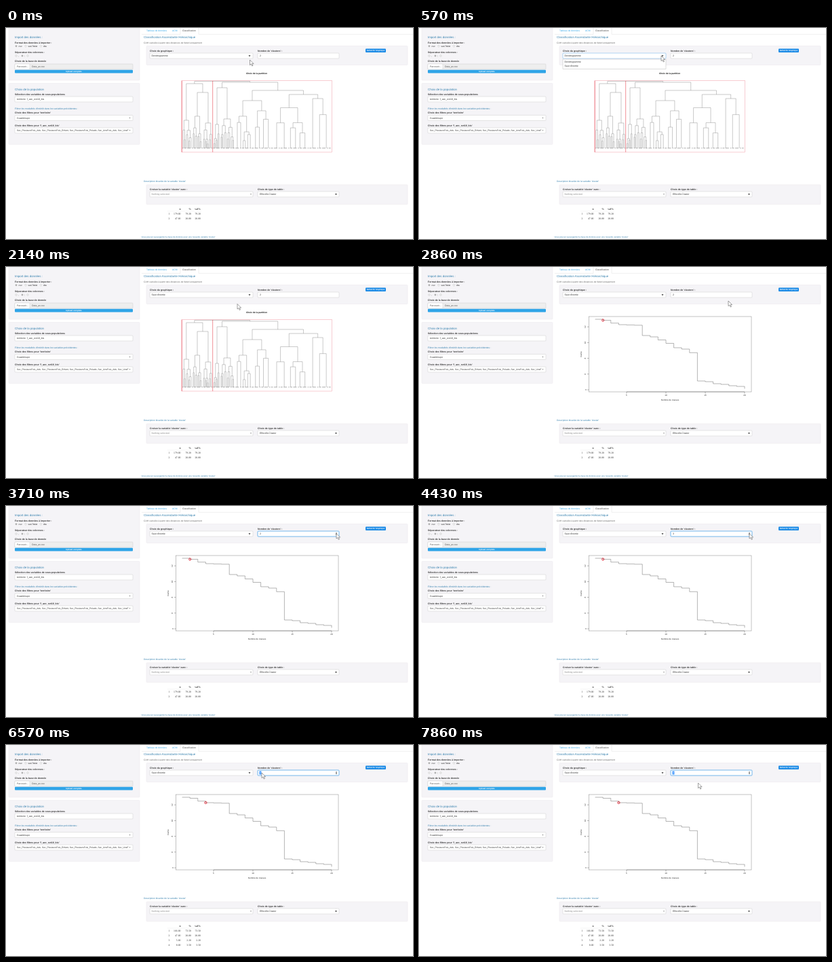
Write an HTML page that moves like this. It is 600 px wide and 311 px high and loops after 8000 ms.

```html
<!DOCTYPE html>
<html lang="fr">
<head>
<meta charset="utf-8">
<style>
html, body { margin: 0; width: 100%; height: 100%; overflow: hidden; background: #fff; }
svg { display: block; width: 100vw; height: 100vh; }
text { font-family: "Liberation Sans", Arial, sans-serif; text-rendering: geometricPrecision; white-space: pre; }
.serif { font-family: "Liberation Serif", Times, serif; }
</style>
</head>
<body>
<svg id="stage" viewBox="0 0 600 311"></svg>
<script>
const BLUE = '#317eac', SKY = '#2fa4e7', INK = '#333', GREY = '#888', RED = '#e02030';
const middle = 'text-anchor="middle" ', bold = 'font-weight="bold" ';

const text = (x, y, size, str, fill = INK, more = '') =>
  `<text x="${x}" y="${y}" font-size="${size}" fill="${fill}" ${more}>${str}</text>`;
const label = (x, y, str) => text(x, y, 3.5, str, INK, bold);
const value = (x, y, str, fill) => text(x, y, 3.5, str, fill);
const rect = (x, y, x2, y2, fill, stroke = 'none', more = '') =>
  `<rect x="${x}" y="${y}" width="${x2 - x}" height="${y2 - y}" fill="${fill}" stroke="${stroke}" stroke-width=".5" ${more}/>`;
const path = (d, stroke, width = .5, fill = 'none') =>
  `<path d="${d}" fill="${fill}" stroke="${stroke}" stroke-width="${width}"/>`;
const well = (x, y, x2, y2) => rect(x, y, x2, y2, '#f5f4f7', '#e8e6ea', 'rx="1"');
const field = (x, y, x2, more = '') => rect(x, y, x2, y + 8, '#fff', '#ccc', 'rx="1" ' + more);
const caret = (x, y) => path(`M${x - 1.5} ${y}h3l-1.5 2z`, 'none', 0, INK);
const smallCaret = (x, y) => path(`M${x - 1} ${y}h2l-1 1.2z`, 'none', 0, '#666');
const radio = (x, y, on) =>
  `<circle cx="${x}" cy="${y}" r="1.25" fill="#fff" stroke="#999" stroke-width=".35"/>` +
  (on ? `<circle cx="${x}" cy="${y}" r=".7" fill="#555"/>` : '');

function leftPanels() {
  return well(4, -4, 197, 77) + well(4, 81.5, 197, 171.5) +
    text(13, 14.8, 4.35, 'Import des données :', BLUE) +
    label(13, 22.6, 'Format des données à importer :') +
    radio(15, 26.7, true) + text(18.5, 28, 3.4, 'csv') +
    radio(29, 26.7) + text(32.5, 28, 3.4, 'sas7bdat') +
    radio(51.5, 26.7) + text(55, 28, 3.4, 'dta') +
    label(13, 36.6, 'Séparateur des colonnes :') +
    radio(15, 41) + text(18, 42, 3.4, ',') +
    radio(24, 41, true) + text(27, 42, 3.4, ';') + radio(32, 41) +
    label(13, 50, 'Choix de la base de donnée') +
    rect(13, 53, 187, 61, '#eee', '#ccc', 'rx="1"') + rect(13, 53, 35, 61, '#fff', '#ccc', 'rx="1"') +
    value(16, 58.4, 'Parcourir...', '#555') + value(38, 58.4, 'Data_av.csv', '#555') +
    rect(13, 61.7, 187, 66.5, SKY, 'none', 'rx="1"') +
    text(100, 65.2, 2.9, 'Upload complete', '#fff', middle + bold) +
    text(13, 91.6, 4.35, 'Choix de la population', BLUE) +
    label(13, 98.8, 'Sélection des variables de sous-populations') +
    field(13, 101, 187) + value(16, 106.4, 'territoire  f_aec_evt18_bis') +
    text(13, 119.5, 3.45, "Filtrer les modalités d'intérêt dans les variables précédentes :", BLUE) +
    label(13, 126, "Choix des filtres pour 'territoire'") +
    field(13, 128.5, 187) + value(16, 133.8, 'Guadeloupe') + smallCaret(182.5, 132) +
    label(13, 144.6, "Choix des filtres pour 'f_aec_evt18_bis'") +
    field(13, 147, 187) + smallCaret(182.5, 150.5) +
    text(16, 152.3, 3.32, 'Sec_PlusieursFois_Ado, Sec_PlusieursFois_Enfant, Sec_PlusieursFois_Préado, Sec_UneFois_Ado, Sec_UneF');
}

function rightPanels() {
  return path('M200 9.3H257V-1M284 -1V9.3H600', '#ddd') +
    text(207, 5.4, 3.35, 'Tableau de données', SKY) + text(245, 5.4, 3.35, 'ACM', SKY) +
    text(260, 5.4, 3.4, 'Classification', '#444') +
    text(203, 15.3, 4.4, 'Classification Ascendante Hiérarchique', BLUE) +
    text(203, 23, 3.4, 'CAH calculée à partir des distances de Ward uniquement', '#666') +
    well(207, 26.5, 592, 54.5) +
    label(212, 34.6, 'Choix du graphique :') +
    field(212, 37, 364, 'id="select"') + caret(359, 40.2) +
    label(371, 34.6, "Nombre de 'clusters' :") + field(371, 37, 491, 'id="number"') +
    rect(530, 30.6, 560, 36.1, '#1c8be6', 'none', 'rx="1"') +
    text(545, 34.4, 2.7, 'Rafraîchir Graphique', '#fff', middle + bold) +
    text(203, 227.2, 3.35, "Description bivariée de la variable 'cluster'", BLUE) +
    well(207, 231, 592, 260) +
    label(212, 238.7, "Croiser la variable 'cluster' avec :") +
    field(212, 241, 364) + value(214.5, 246.4, 'Nothing selected', '#888') + smallCaret(361, 244.6) +
    label(371, 238.7, 'Choix de type de table :') +
    field(371, 241, 491) + value(374, 246.4, 'Effectifs Cluster') + caret(486.5, 244.3);
}

function dendrogram() {
  const base = 177;
  let seed = 11, d = '';
  const rnd = () => (seed = seed * 16807 % 2147483647) / 2147483647;
  const join = (y, a, b) => {
    d += `M${a.x} ${a.y}V${y}H${b.x}V${b.y}`;
    return { x: (a.x + b.x) / 2, y };
  };
  // splits a span of leaves at random until the pieces are narrower than step
  const clump = (x0, x1, y, step) => {
    if (x1 - x0 < step) return { x: (x0 + x1) / 2, y: base };
    const cut = x0 + (x1 - x0) * (.35 + .3 * rnd());
    const next = () => y + (base - y) * (.15 + .45 * rnd());
    return join(y, clump(x0, cut, next(), step), clump(cut, x1, next(), step));
  };
  const left = join(82, clump(260, 274, 136, 2.4),
    join(95, clump(275, 289, 130, 2.4), clump(290, 304, 140, 2.4)));
  const mid = join(88, clump(306, 315, 142, 2.4), clump(316, 336, 134, 2.8));
  const right = join(92,
    join(107, clump(338, 362, 130, 6), clump(364, 390, 122, 9)),
    join(98, clump(393, 445, 117.5, 13), clump(446, 478, 104, 13)));
  join(78.5, left, join(80, mid, right));
  return text(369.5, 67.6, 3.25, 'Choix de la partition', '#111', middle + bold) +
    path(d, GREY, .45) +
    `<path d="M260 ${base}H479" stroke="#888" stroke-width=".7" stroke-dasharray="1.6 1.2 3 1.4 5 2"/>` +
    rect(259, 77.5, 480.3, 183, 'none', '#f09aa4') +
    path('M259.3 78V183M304.7 78V183', RED, .5);
}

const levels = [77, 78.5, 82.7, 85, 85.4, 85.8, 101, 103, 107.5, 112.5, 119, 121, 126.3, 168, 169, 172, 173, 175, 176, 179.5];
const levelX = k => 248 + 11.6 * k;

function inertia() {
  let d = '', marks = 'M306 184H480';
  levels.forEach((y, i) => d += (i ? 'H' : 'M') + levelX(i + 1) + (i ? 'V' : ' ') + y);
  let s = rect(250.5, 73, 490, 184, 'none', GREY);
  for (let v = 4; v <= 12; v += 2) {
    const y = 181 - (v - 4) * 11.6;
    marks += `M250.5 ${y}h-2.5`;
    s += text(246.5, y, 3.2, v, INK, `${middle} transform="rotate(-90 246.5 ${y})"`);
  }
  for (let k = 5; k <= 20; k += 5) {
    marks += `M${levelX(k)} 184v2.5`;
    s += text(levelX(k), 190, 3.2, k, INK, middle);
  }
  return s + path(marks, '#666') + path(d, '#777', .55) +
    text(370, 196.7, 3.1, 'Nombre de classes', INK, middle) +
    text(240, 128.5, 3.1, 'Inertie', INK, middle + 'transform="rotate(-90 240 128.5)"') +
    `<circle id="mark" r="1.6" fill="none" stroke="${RED}" stroke-width=".9"/>`;
}

function table(rows) {
  const line = (cells, y, more = '') => cells.map((c, i) =>
    text([241.5, 257.5, 273, 287][i], y, 3.8, c, INK, 'class="serif" text-anchor="end" ' + more)).join('');
  return line(['', 'n', '%', 'val%'], 268, bold) + path('M238 270H288', '#e4e4e4', .4) +
    rows.map((r, i) => line([i + 1, ...r], 275.2 + 7 * i)).join('');
}

const arrow = path('M0 0V7.6L1.8 6L3.2 9L4.5 8.4L3.2 5.6H5.6Z', '#444', .5, '#fff');
const hand = path('M-1 1Q0-.6 1 1V4L5 5Q6 5.5 5.5 7L4.6 10H-.3L-3.2 6.3Q-3.3 5-1 6.2Z', '#444', .5, '#fff');
const group = (id, body) => `<g id="${id}">${body}</g>`;

stage.innerHTML = leftPanels() + rightPanels() +
  '<text id="choice" x="214.5" y="42.4" font-size="3.5" fill="#333"></text>' +
  group('picked', rect(373.5, 38.6, 376.5, 43.4, '#3390ff')) +
  '<text id="count" x="374" y="42.4" font-size="3.5"></text>' +
  group('spin', path('M485.8 40.6l1.2-1.6 1.2 1.6zM485.8 41.6l1.2 1.6 1.2-1.6z', 'none', 0, '#444')) +
  group('tree', dendrogram()) + group('curve', inertia()) +
  group('two', table([['179.00', '79.20', '79.20'], ['47.00', '20.80', '20.80']]) +
    text(199.5, 309, 3.05, "Vous pouvez sauvegarder la base de donnée avec une nouvelle variable 'cluster'", BLUE)) +
  group('four', table([['166.00', '73.50', '73.50'], ['47.00', '20.80', '20.80'],
    ['5.00', '2.20', '2.20'], ['8.00', '3.50', '3.50']])) +
  group('menu', rect(212, 46, 364, 60.5, '#fff', '#bbb') +
    value(214.5, 51, 'Dendrogramme') + value(214.5, 57.2, "Saut d'inertie")) +
  group('pointer', group('arrowShape', arrow) + group('handShape', hand));

// pointer stops: time, x, y
const stops = [[0, 359.5, 47], [430, 357, 41], [1000, 357, 41], [1290, 345.5, 48], [1710, 341, 55], [2140, 341, 54.5],
  [2860, 456, 50], [3570, 487, 40.5], [5570, 487, 40.5], [6430, 377, 41], [6710, 377, 41], [7570, 411.5, 56], [8000, 411.5, 56]];

function pointerAt(t) {
  const i = stops.findIndex(s => s[0] > t), a = stops[i - 1], b = stops[i];
  const u = (t - a[0]) / (b[0] - a[0]), e = u * u * (3 - 2 * u);
  return [a[1] + (b[1] - a[1]) * e, a[2] + (b[2] - a[2]) * e];
}

const show = (el, on) => el.setAttribute('display', on ? 'inline' : 'none');

function draw(now) {
  const ms = now % 8000;
  const t = Math.floor((ms + 5) * 7 / 1000) * 1000 / 7; // seven pictures a second
  const [x, y] = pointerAt(Math.min(t, 7990));
  const open = t >= 428 && t < 1710, focus = t >= 3710, plotted = t >= 2420, updated = t >= 4990;
  const onMenu = open && y > 46;
  pointer.setAttribute('transform', `translate(${x} ${y})`);
  show(handShape, onMenu);
  show(arrowShape, !onMenu);
  show(menu, open);
  choice.textContent = t < 1710 ? 'Dendrogramme' : "Saut d'inertie";
  select.setAttribute('stroke', open ? '#66afe9' : '#ccc');
  number.setAttribute('stroke', focus ? '#66afe9' : '#ccc');
  number.setAttribute('stroke-width', focus ? .9 : .5);
  show(spin, focus);
  show(picked, t >= 6570);
  count.textContent = t < 4280 ? 2 : t < 4570 ? 3 : 4;
  count.setAttribute('fill', t >= 6570 ? '#fff' : INK);
  show(tree, !plotted);
  show(curve, plotted);
  show(two, !updated);
  show(four, updated);
  const k = updated ? 4 : 2;
  mark.setAttribute('cx', levelX(k));
  mark.setAttribute('cy', levels[k - 1]);
}

const start = performance.now();
function tick() {
  draw(performance.now() - start);
  requestAnimationFrame(tick);
}
tick();
</script>
</body>
</html>
```
